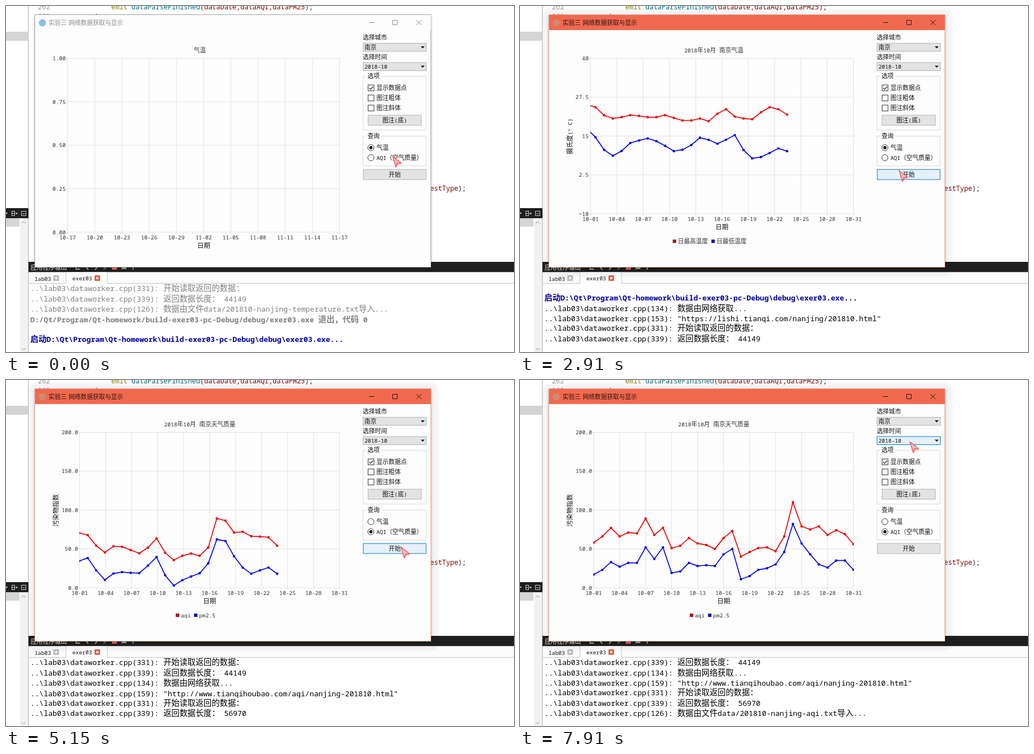
Recreate the animation shown at these times as an HTML page. Size 907 by 618 pixels, loop 7990 ms.

```html
<!DOCTYPE html>
<html lang="zh-CN">
<head>
<meta charset="utf-8">
<title>Chart demo</title>
<style>
html, body { margin: 0; width: 100%; height: 100%; overflow: hidden; background: #fff; }
svg { display: block; width: 907px; height: 618px; }
text { white-space: pre; }
</style>
</head>
<body>
<svg id="stage" viewBox="0 0 907 618" xmlns="http://www.w3.org/2000/svg"></svg>
<script>
const LOOP = 7990;
const CJK = "'Noto Sans CJK SC','Noto Sans CJK',sans-serif";
const MONO = "'Noto Sans Mono',monospace";

// Wide and Latin runs get their own font, size and weight.
function text(x, y, str, o = {}) {
  const { wide = 10.8, latin = 9.75, fill = '#111', bold, thin = 350, anchor = 'start', extra = '' } = o;
  const runs = (str.match(/[\x00-\xff]+|[^\x00-\xff]+/g) || []).map(run => {
    const isLatin = run.charCodeAt(0) < 256;
    const weight = bold || (isLatin ? o.latinWeight || 400 : thin);
    return `<tspan font-family="${isLatin ? MONO : CJK}" font-size="${isLatin ? latin : wide}" font-weight="${weight}">${run}</tspan>`;
  }).join('');
  return `<text x="${x}" y="${y + wide * 0.36}" fill="${fill}" text-anchor="${anchor}" ${extra}>${runs}</text>`;
}
const rect = (x, y, w, h, fill, stroke, extra = '') =>
  `<rect x="${x}" y="${y}" width="${w}" height="${h}" fill="${fill}"${stroke ? ` stroke="${stroke}"` : ''} ${extra}/>`;
const path = (d, stroke, width = 1, fill = 'none') =>
  `<path d="${d}" stroke="${stroke}" stroke-width="${width}" fill="${fill}"/>`;
const mid = { anchor: 'middle' };

/* ---------- IDE behind the window ---------- */
function backdrop() {
  const code = { latin: 12, wide: 12 };
  const at = (x, y, s, fill) => text(x, y, s, { ...code, fill });
  const closeBox = (x, fill) => rect(x, 481, 10, 10, fill, '', 'rx="1.5"') +
    path(`M${x + 3} 484l4 4m0-4l-4 4`, '#fff', 1.4);
  return rect(0, 0, 907, 618, '#fff') +
    at(57, 2, '262', '#9a9a9a') + at(57, 19, '263', '#9a9a9a') + at(159, 19, '}', '#222') +
    at(188, 2, 'emit', '#808000') + at(224, 2, 'dataParseFinished', '#00677c') +
    at(346.5, 2, '(', '#222') + at(353.7, 2, 'dataDate,dataAQI,dataPM25', '#800000') + at(533.7, 2, ');', '#222') +
    at(757, 326, 'estType', '#800000') + at(807, 326, ');', '#222') +
    rect(0, 46, 39, 16, '#d4d4d4') +
    path('M40 0V618', '#a8a8a8') +
    rect(0, 361, 40, 18, '#1f1f1f') +
    path('M10.500 366.500h5v8h-5zM10 370.500h6M17 370.500h4M19 368.500v4M27.500 366.500h8v8h-8zM29 371h5', '#d0d0d0') +
    path('M0 369h3l-2 3z', 'none', 0, '#ddd') +
    rect(0, 379, 24, 15, '#d5d5d5') + rect(25, 379, 14, 239, '#f2f2f2') +
    path('M28 388.500l3.500-3.500l3.500 3.500M28 611l3.500 3.500l3.500-3.500', '#8a8a8a') +
    rect(40, 457, 867, 18.500, '#1f1f1f') +
    text(44, 467, '应用程序输出', { fill: '#eee' }) +
    path('M125 464v6h7M147 465l-3 3l3 3M159 465l3 3l-3 3M206 470l8-6M227 464v7', '#c8c8c8', 1.3) +
    rect(189, 463, 9, 8, '#e06060') + rect(207, 467, 8, 3, '#8aa08a') + path('M174 464l6 4l-6 4z', 'none', 0, '#555') +
    rect(41, 475.500, 866, 20, '#fbfbfb') + rect(107, 475.500, 74, 21, '#fff') +
    path('M41 495.500H107V476M181 476V495.500H907', '#c4c4c4') +
    text(51, 487, 'lab03') + text(118.500, 486.500, 'exer03') +
    closeBox(84.500, '#b8b8b8') + closeBox(158, '#dd5f48');
}

/* ---------- console ---------- */
const at = n => `..\\lab03\\dataworker.cpp(${n}): `;
const GREY = '#808080', NAVY = '#0000a0';
const LOG = [
  [at(331) + '开始读取返回的数据：', GREY],
  [at(339) + '返回数据长度： 44149', GREY],
  [at(126) + '数据由文件data/201810-nanjing-temperature.txt导入...', GREY],
  ['D:/Qt/Program/Qt-homework/build-exer03-pc-Debug/debug/exer03.exe 退出，代码 0', GREY, 700],
  ['', GREY],
  ['启动D:\\Qt\\Program\\Qt-homework\\build-exer03-pc-Debug\\debug\\exer03.exe...', NAVY, 700],
  [at(134) + '数据由网络获取...'],
  [at(153) + '"https://lishi.tianqi.com/nanjing/201810.html"'],
  [at(331) + '开始读取返回的数据：'],
  [at(339) + '返回数据长度： 44149'],
  [at(134) + '数据由网络获取...'],
  [at(159) + '"http://www.tianqihoubao.com/aqi/nanjing-201810.html"'],
  [at(331) + '开始读取返回的数据：'],
  [at(339) + '返回数据长度： 56970'],
  [at(126) + '数据由文件data/201810-nanjing-aqi.txt导入...']
];
function consoleLines(count) {
  let y = count === 10 ? 593.5 : 595, out = '';
  for (let i = count - 1; i >= 0 && y > 495; i--) {
    const [s, fill = '#000', bold] = LOG[i];
    out += text(43.5, y, s, { wide: 14.4, latin: 13.2, fill, bold, thin: 300, latinWeight: 500 });
    const above = LOG[i - 1];
    y -= above && /[^\x00-\xff]/.test(above[0]) ? 18.6 : 16.8;
  }
  return out;
}

/* ---------- window frame ---------- */
function frame(active) {
  const ink = active ? '#2a1512' : '#8c8c8c';
  return (active ? rect(41, 5, 731, 478, '#000', '', 'rx="12" opacity="0.04" filter="url(#blur)"') : '') +
    rect(51, 17, 708, 450, '#000', '', 'opacity="0.3" filter="url(#blur)"') +
    rect(51.5, 15.5, 707, 451, '#fdfdfd', active ? '#eba79b' : '#a8a8a8') +
    rect(52, 16, 706.5, 27, active ? '#f0694f' : '#fdfdfd') +
    `<circle cx="65" cy="30" r="6.5" fill="${active ? '#d08a6c' : '#8fc0d8'}"/>` +
    text(76, 30, '实验三 网络数据获取与显示', { latin: 6, fill: ink, thin: 400 }) +
    path('M648 29.500h9.500M690.500 25.500h8v8h-8zM732.500 25l9 9m0-9l-9 9', ink);
}

/* ---------- chart ---------- */
const HIGH = [25,25,27,26,25,26,26,24,24,20,21,21,22,21,21,21,22,20,20,20,21,19,24,23,20,21,20,24,24,23,21];
const LOW = [14,15,14,16,16,15,17,18,13,10,9,12,14,14,15,13,12,10,12,13,16,13,13,15,16,8,9,9,11,12,10];
const AQI = [58,66,77,66,71,70,89,68,77,51,54,64,57,55,50,64,73,40,46,51,52,47,66,110,79,75,79,68,74,69,56];
const PM = [17,23,33,27,32,32,52,37,52,19,21,32,28,29,28,43,50,11,15,23,25,30,46,82,57,43,30,26,35,35,23];
const days = n => Array.from({ length: 11 }, (_, i) => '10-' + String(n + 3 * i).padStart(2, '0'));
for (let i = 9; i < 11; i++) days[i] = i;
const TOP = 93.5, RIGHT = 595.5;
const CHARTS = [
  { left: 110, bottom: 404, ticks: ['1.00', '0.75', '0.50', '0.25', '0.00'], end: 106.5, axisX: 353,
    labels: ['10-17','10-20','10-23','10-26','10-29','11-02','11-05','11-08','11-11','11-14','11-17'], unit: '', legend: [], series: [] },
  { left: 126, bottom: 371, ticks: ['40', '27.5', '15', '2.5', '−10'], end: 122.5, axisX: 360.5, labels: days(1),
    unit: '摄氏度(° C)', legend: [[273, '日最高温度'], [342, '日最低温度']], series: [HIGH, LOW], min: -10, span: 50 },
  { left: 131.5, bottom: 371, ticks: ['200.0', '150.0', '100.0', '50.0', '0.0'], end: 128.5, axisX: 363.5, labels: days(1),
    unit: '污染物指数', legend: [[303.5, 'aqi'], [336, 'pm2.5']], series: [AQI, PM], min: 0, span: 200 }
];
const COLORS = ['#f00000', '#0000f0'];
const fix = v => v.toFixed(2);

function axes(c) {
  const stepX = (RIGHT - c.left) / 10, stepY = (c.bottom - TOP) / 4, label = { fill: '#333' };
  let grid = '', out = '';
  c.labels.forEach((s, i) => {
    const x = c.left + stepX * i;
    grid += `M${fix(x)} ${TOP}V${c.bottom + 3}`;
    out += text(x, c.bottom + 9, s, { ...label, ...mid });
  });
  c.ticks.forEach((s, i) => {
    const y = TOP + stepY * i;
    grid += `M${c.left - 3} ${fix(y)}H${RIGHT}`;
    out += text(c.end, y - 0.3, s, { ...label, anchor: 'end' });
  });
  const strong = { wide: 11.6, latin: 9.8, bold: 500, ...mid };
  out += text(c.axisX, c.bottom + 24.3, '日期', strong);
  out += text(89, 233, c.unit, { ...strong, extra: 'transform="rotate(-90 89 233)"' });
  c.legend.forEach(([x, s], i) => {
    out += rect(x, 417.5, 5.5, 5.5, ['#d00000', '#0000d0'][i], '#333', 'stroke-width="0.6"') + text(x + 8.7, 419.7, s, label);
  });
  return path(grid, '#e2e2e2') + out;
}

// Points glide in from their left neighbour's place on a provisional scale.
function series(c, elapsed, gain, shift) {
  const rest = Math.pow(1 - Math.min(1, Math.max(0, elapsed / 1000)), 4);
  const step = (RIGHT - c.left) / 30;
  return c.series.map((data, k) => {
    const pts = data.map((v, i) => {
      const from = data[Math.max(0, i - 1)] * gain + shift;
      const val = v + (from - v) * rest;
      return [fix(c.left + step * i - (331 + 0.28 * i) * rest),
              fix(c.bottom - (val - c.min) / c.span * (c.bottom - TOP))];
    });
    const dots = pts.map(([x, y]) => `<circle cx="${x}" cy="${y}" r="2.2"/>`).join('');
    return path('M' + pts.join('L'), COLORS[k], 1.7) + `<g fill="${COLORS[k]}">${dots}</g>`;
  }).join('');
}

/* ---------- side panel ---------- */
const LOOK = {
  normal: ['#e3e3e3', '#b4b4b4', '#111'],
  hover: ['#e5f1fb', '#0078d7', '#111'],
  press: ['#cce4f7', '#005499', '#111'],
  fading: ['#e5f1fb', '#0078d7', '#838383'],
  off: ['#cccccc', '#bfbfbf', '#838383']
};
function combo(y, s, look) {
  const [bg, line, ink] = LOOK[look];
  return rect(637.5, y, 113, 14.5, bg, line) + text(640, y + 7.3, s, { fill: ink }) +
    path(`M740.500 ${y + 5.5}h7l-3.500 3.800z`, 'none', 0, ink);
}
function button(x, y, w, s, look) {
  const [bg, line, ink] = LOOK[look];
  return rect(x, y, w, 18, bg, line) + text(x + w / 2, y + 9, s, { fill: ink, ...mid });
}
const group = (y, h, s) => rect(637.5, y, 112.5, h, 'none', '#dcdcdc') +
  rect(643, y - 4, 27, 8, '#fdfdfd') + text(645.5, y, s);
const check = (y, s, on) => rect(646.5, y - 5.5, 10.5, 10.5, '#fff', '#333') +
  (on ? path(`M648.500 ${y}l2.500 2.500l4.500-5`, '#222', 1.2) : '') + text(661.5, y, s);
const radio = (y, s, on, hot) => `<circle cx="651.5" cy="${y}" r="5.5" fill="#fff" stroke="${hot ? '#0078d7' : '#333'}"/>` +
  (on ? `<circle cx="651.5" cy="${y}" r="3" fill="#222"/>` : '') + text(661.5, y, s);

function panel(s) {
  return text(637, 56.5, '选择城市') + combo(66.5, '南京', s.waiting ? 'off' : 'normal') +
    text(637, 91.5, '选择时间') + combo(101, '2018-10', s.waiting ? 'off' : s.date) +
    group(125.5, 96, '选项') + check(146.5, '显示数据点', true) + check(164.5, '图注粗体') + check(182.5, '图注斜体') +
    button(646.5, 195, 95, '图注(底)', 'normal') +
    group(232.5, 53, '查询') + radio(253, '气温', !s.aqi) + radio(271, 'AQI（空气质量）', s.aqi, s.radioHot) +
    button(638, 292, 112, '开始', s.start);
}

/* ---------- pointer ---------- */
const MOVES = [
  [0, 690, 268], [830, 670, 299], [2700, 670, 299], [3450, 704, 270], [3760, 704, 271],
  [4200, 705, 298], [5300, 705, 298], [5800, 703, 276], [5990, 703, 276], [6200, 697, 302],
  [6850, 697, 302], [7450, 701, 86], [7600, 701, 86], [7850, 696, 110], [LOOP, 696, 110]
];
const CLICKS = [[830, 960], [3600, 3780], [4290, 4430], [6230, 6370]];
const within = (t, a, b) => t >= a && t < b;

function pointer(t) {
  const i = MOVES.findIndex(m => m[0] > t);
  const [t0, x0, y0] = MOVES[i - 1], [t1, x1, y1] = MOVES[i];
  const u = (t - t0) / (t1 - t0), e = u * u * (3 - 2 * u);
  return [x0 + (x1 - x0) * e, y0 + (y1 - y0) * e];
}

/* ---------- scene ---------- */
const ARROW = 'M0.500 0.500L15.500 12.500L8.500 13L6 19.500z';
const stage = document.getElementById('stage');
stage.innerHTML = `<defs>
  <filter id="blur" x="-5%" y="-5%" width="110%" height="110%"><feGaussianBlur stdDeviation="2"/></filter>
  <filter id="soft" x="-50%" y="-50%" width="200%" height="200%"><feGaussianBlur stdDeviation="1.3"/></filter>
  <clipPath id="plot"><rect id="plotBox" y="${TOP}" height="310"/></clipPath>
  <clipPath id="out"><rect x="41" y="496" width="866" height="122"/></clipPath></defs>
  ${backdrop()}
  <g id="log" clip-path="url(#out)"></g><g id="frame"></g><g id="title"></g><g id="axes"></g>
  <g id="lines" clip-path="url(#plot)"></g><g id="panel"></g>
  <circle id="click" r="9.5" fill="#f4e11c" opacity="0.85"/>
  <g id="arrow"><path d="${ARROW}" transform="translate(1 1.500)" fill="#f06060" opacity="0.8" filter="url(#soft)"/>
  ${path(ARROW, '#e85a5a', 1.3, '#f4bcbc')}</g>`;

const el = id => document.getElementById(id);
const cache = {};
function put(id, key, make) {
  if (cache[id] === key) return;
  cache[id] = key;
  el(id).innerHTML = make();
}

function startLook(t, y, pressed) {
  if (within(t, 1830, 2680) || within(t, 4610, 4910)) return 'off';
  if (within(t, 1590, 1830) || within(t, 4450, 4610)) return 'fading';
  if (y < 291 || y > 311) return 'normal';
  return pressed ? 'press' : 'hover';
}

function render(t) {
  const [x, y] = pointer(t);
  const pressed = CLICKS.some(([a, b]) => within(t, a, b));

  const count = t < 910 ? 6 : t < 2680 ? 8 : t < 4370 ? 10 : t < 4910 ? 12 : t < 6380 ? 14 : 15;
  put('log', count, () => consoleLines(count));
  put('frame', t >= 70, () => frame(t >= 70));

  const title = t < 1590 ? '气温' : t < 4450 ? '2018年10月 南京气温' : '2018年10月 南京天气质量';
  put('title', title, () => text(346, 79.5, title, { fill: '#333', ...mid }));

  const mode = t < 2680 ? 0 : t < 4910 ? 1 : 2, chart = CHARTS[mode];
  put('axes', mode, () => axes(chart));
  el('plotBox').setAttribute('x', chart.left - 0.5);
  el('plotBox').setAttribute('width', RIGHT - chart.left + 1);
  const [begin, gain, shift] = mode < 2 ? [2680, 1.2, -4] : t < 6380 ? [4908, 1.25, -36] : [6400, 1.25, -20];
  const elapsed = Math.min(1000, t - begin);
  put('lines', mode + '/' + begin + '/' + elapsed, () => series(chart, elapsed, gain, shift));

  const state = {
    waiting: within(t, 1590, 2680) || within(t, 4450, 4910),
    date: y > 101 && y < 116 ? 'hover' : 'normal',
    aqi: t >= 3780,
    radioHot: within(t, 3400, 3900),
    start: startLook(t, y, pressed)
  };
  put('panel', JSON.stringify(state), () => panel(state));

  el('arrow').setAttribute('transform', `translate(${fix(x)} ${fix(y)})`);
  el('click').setAttribute('cx', x + 1);
  el('click').setAttribute('cy', y + 0.5);
  el('click').setAttribute('visibility', pressed ? 'visible' : 'hidden');
}

const origin = performance.now();
function tick() {
  render((performance.now() - origin) % LOOP);
  requestAnimationFrame(tick);
}
tick();
</script>
</body>
</html>
```
